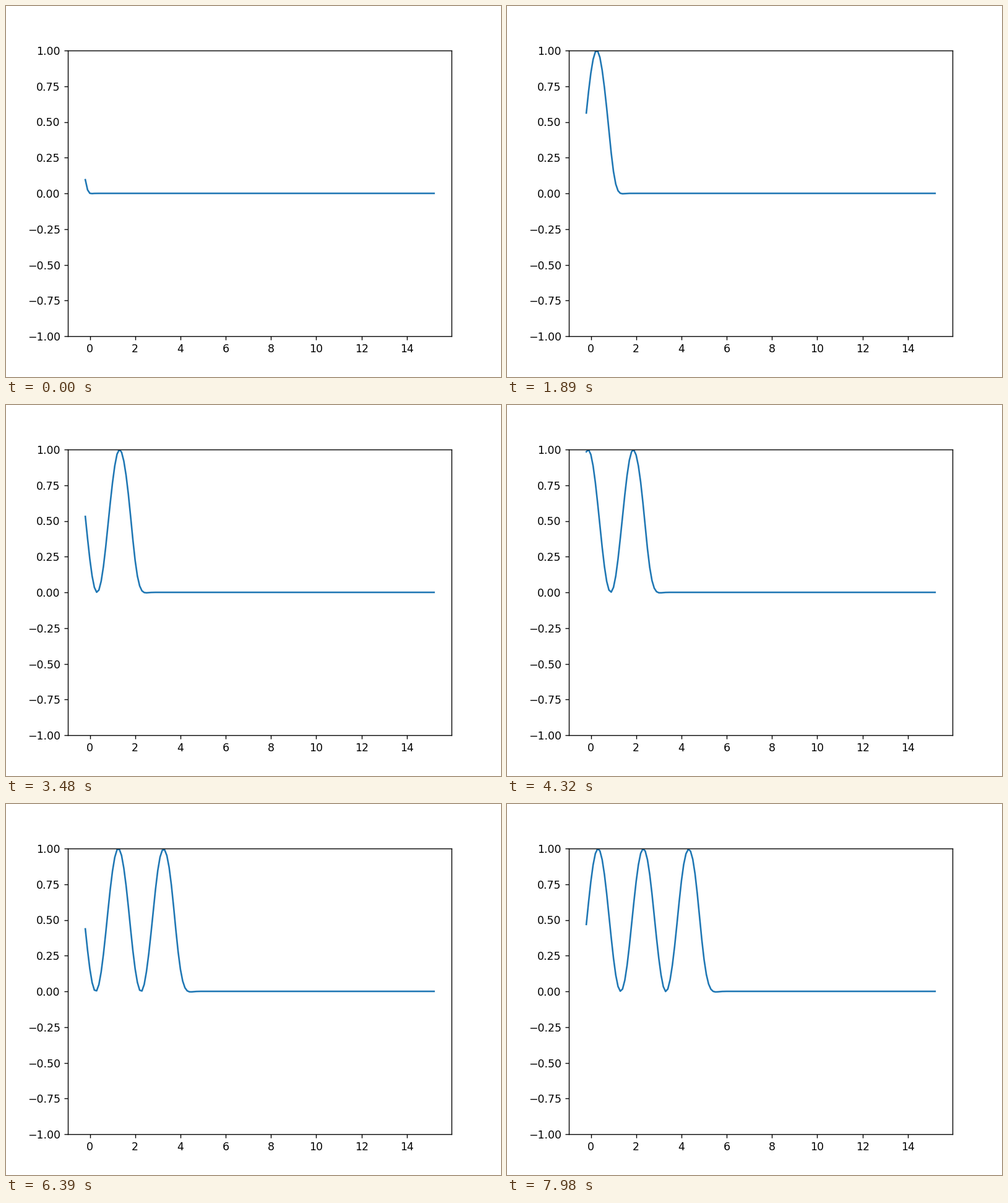
Animation of 800 by 600 pixels, one loop 8 s. Source, as a matplotlib script:

```python
import matplotlib.pyplot as plt
import numpy as np
from matplotlib.animation import FuncAnimation

LOOP_MS = 8000
FRAMES = 267
LEAD_STEPS = 10          # steps already taken when the loop begins
DX, DT, SPEED = 0.1, 0.02, 1.0

x = DX * np.arange(-2, 153)


def inflow(t):
    """Values of the wave fed in at the two leftmost points."""
    tau = np.maximum(t - (x[:2] - x[0]) / SPEED, 0)
    return np.sin(np.pi * tau / 2) ** 2


def rate(t, u):
    """Fourth-order central advection with a driven left edge."""
    u = u.copy()
    u[:2] = inflow(t)
    du = np.zeros_like(u)
    slope = (u[:-4] - 8 * u[1:-3] + 8 * u[3:-1] - u[4:]) / (12 * DX)
    du[2:-2] = -SPEED * slope
    return du


def advance(t, u):
    k1 = rate(t, u)
    k2 = rate(t + DT / 2, u + DT / 2 * k1)
    k3 = rate(t + DT / 2, u + DT / 2 * k2)
    k4 = rate(t + DT, u + DT * k3)
    u = u + DT / 6 * (k1 + 2 * k2 + 2 * k3 + k4)
    u[:2] = inflow(t + DT)
    return u


def simulate(steps):
    states = [np.zeros_like(x)]
    for n in range(steps):
        states.append(advance(n * DT, states[-1]))
    return states


states = simulate(LEAD_STEPS + FRAMES)

fig, ax = plt.subplots(figsize=(6.4, 4.8), dpi=125)
line, = ax.plot(x, states[LEAD_STEPS], color="#1f77b4", lw=1.5)
ax.set_ylim(-1, 1)


def update(i):
    line.set_ydata(states[LEAD_STEPS + i])
    return line,


anim = FuncAnimation(fig, update, frames=FRAMES, interval=LOOP_MS / FRAMES,
                     repeat=True, repeat_delay=0, blit=False)
plt.show()
```
